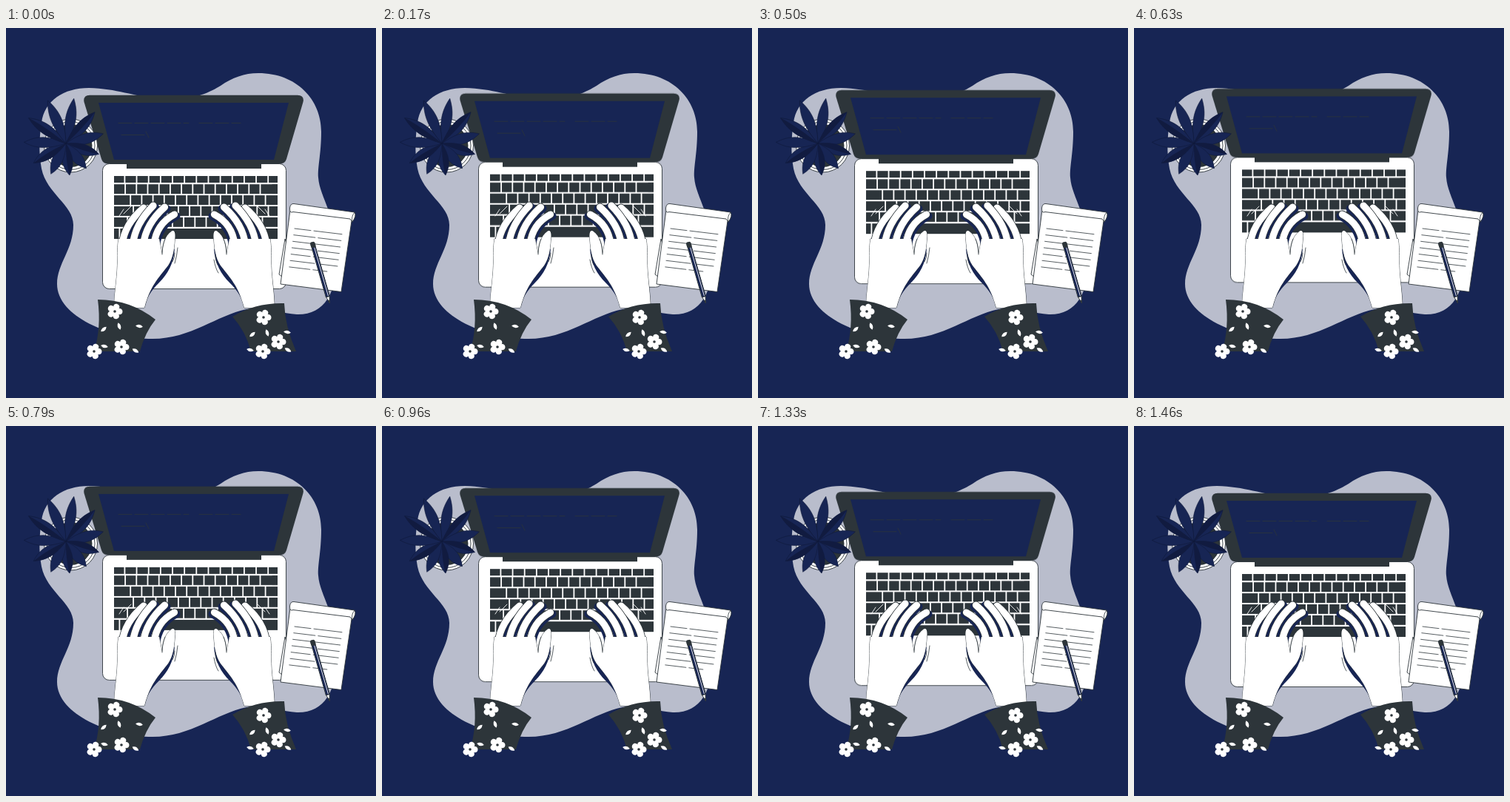
These frames come from a looping animation (500x500 px, 1500 ms). An HTML page:

```html
<!DOCTYPE html>
<html lang="en">
<head>
<meta charset="utf-8">
<title>Typing</title>
<style>
  html, body { margin: 0; width: 100%; height: 100%; overflow: hidden; background: #172554; }
  svg { display: block; width: 100%; height: 100%; }
  .navy { fill: #172554; }
  .dark { fill: #2d353a; }
  .white { fill: #fff; }
  .line { stroke: #2d353a; stroke-width: .9; stroke-linejoin: round; }
  .thin { fill: none; stroke: #2d353a; stroke-width: .8; stroke-linecap: round; }
  .spark { fill: none; stroke: #fff; stroke-width: .9; stroke-linecap: round; }
  .finger { fill: none; stroke-linecap: round; }
</style>
</head>
<body>
<svg viewBox="0 0 500 500">
  <defs>
    <path id="palm" d="M146 378C147 350 151 335 150.500 312C150.500 300 151 292 152 285H207L211 306
      C212 294 214 281 224 274.500C229 272 229 281 228 287C227 300 226 310 219 321C206 338 195 348 187 378Z"/>
    <g id="arm">
      <path class="navy" d="M228 298C227 318 218 333 207 344C196 355 190 364 187 378L184 372Z"/>
      <g id="shadows"></g>
      <use href="#palm" class="white line"/>
      <g id="fingers"></g>
      <use href="#palm" class="white"/>
      <path class="spark" d="M153 254L159 245M159 251L169 241"/>
      <path class="thin" d="M211 306Q211 294 215 285"/>
    </g>
    <path id="leaf" d="M0 0C10 -20 10 -34 0 -50C-9 -34 -8 -20 0 0Z"/>
    <path id="shade" d="M0 0C2 -18 2 -34 0 -50C-9 -34 -8 -20 0 0Z"/>
    <path id="petal" d="M0 0C-6 -4 -5 -10.500 0 -10.500C5 -10.500 6 -4 0 0Z"/>
    <path id="bit" d="M-5 0Q0 -4.500 5 0Q0 4.500 -5 0Z"/>
  </defs>

  <path fill="#b9bdcc" d="M48 128C52 98 78 81 112 81C150 82 172 92 207 96C250 100 275 87 290 78
    C306 67 322 61 341 61C393 61 426 97 426 140C426 170 421 187 422 202C424 230 448 254 447 312
    C447 358 430 388 393 387C370 386 350 376 325 380C285 388 250 420 198 420C142 420 69 390 69 346
    C69 318 91 300 91 266C91 239 55 224 48 190C44 168 45 148 48 128Z"/>

  <g id="laptop">
    <rect class="white line" x="130.500" y="183.500" width="248" height="169" rx="9"/>
    <path class="dark" d="M113 90.700H394Q403.500 91 401.500 100L379 177Q377 183.500 370 183.500H138Q131 183.500 129 177
      L105.500 100Q104 91 113 90.700Z"/>
    <path class="dark" d="M163 183H345V190H163Z"/>
    <path class="navy" d="M125 101H382L362 178H146Z"/>
    <path class="thin" stroke-dasharray="18 4" d="M152 128.500H247M261 128.500H317"/>
    <path class="thin" d="M156 144.500H187M189 140L193 148"/>
    <g id="keys" class="dark"></g>
  </g>

  <g id="plant">
    <circle class="white line" cx="87.500" cy="159" r="36"/>
    <circle class="white line" cx="87.500" cy="159" r="32.500"/>
    <circle class="dark" cx="87.500" cy="159" r="29"/>
  </g>

  <g id="pad">
    <path class="white line" d="M377 285L369 333L373 336L395 339Z"/>
    <path class="white line" d="M384 246L468 254L453 356.500L371 346Z"/>
    <path class="white line" d="M389 237.500L471 249Q474 254 468 262L465 258L388 248.500Q383 251 383.500 243
      Q384.500 237 389 237.500Z"/>
    <path class="thin" d="M468 262Q466 255 471 249"/>
    <g id="notes"></g>
    <g transform="translate(414.500 292) rotate(-16)">
      <path class="white line" d="M-2.500 73L0 83L2.500 73Z"/>
      <path class="dark" d="M-1.200 79L0 83L1.200 79Z"/>
      <rect class="navy line" x="-2.600" width="5.200" height="74"/>
      <path d="M.8 5V73" stroke="#fff" stroke-width=".8"/>
      <rect class="dark" x="-3.300" y="-3" width="6.600" height="8" rx="2.500"/>
    </g>
  </g>

  <use href="#arm"/>
  <use href="#arm" transform="translate(509 0) scale(-1 1)"/>
  <path class="thin" d="M232 297Q231 308 228 318M228 304Q228 311 225 316
    M281 313Q283 325 287 331M283 306Q283 315 286 320"/>

  <path class="dark" d="M124 367Q168 367 202 394Q188 411 181 437H119Q129 405 124 367Z"/>
  <path class="dark" d="M306 390Q337 371 376 372Q377 403 392 437H331Q324 410 306 390Z"/>
  <g id="print"></g>
</svg>
<script>
  const $ = id => document.getElementById(id);
  const put = (id, list) => $(id).insertAdjacentHTML('beforeend', list.join(''));
  const times = (n, fn) => Array.from({ length: n }, (_, i) => fn(i));
  const use = (id, x, y, turn, size = 1) =>
    `<use href="#${id}" transform="translate(${x} ${y}) rotate(${turn}) scale(1 ${size})"/>`;

  // Keys: a first key of its own width, then an even pitch up to the right edge
  const row = (y, h, first, pitch) => {
    const keys = [[146, 146 + first]];
    for (let x = 147.8 + first; x < 360; x += pitch)
      keys.push([x, x + pitch * 1.7 > 367 ? 367 : x + pitch - 1.8]);
    return keys.map(([a, b]) => `<rect x="${a}" y="${y}" width="${b - a}" height="${h}"/>`);
  };
  put('keys', [
    ...row(200, 9, 13.5, 16.15),
    ...[14.2, 21.3, 25.2, 17.2].flatMap((first, i) => row(211.2 + i * 14.9, 12.9, first, 15.2)),
    ...row(271, 14, 6.5, 212)
  ]);

  // Fingers from little to index, given by their tips
  const tips = [[186, 243], [199, 240], [214.5, 242], [227.5, 252]];
  const fingers = tips.map(([x, y], i) => {
    const base = 157 + i * 14.3;
    return `<path class="finger" d="M${base} 293Q${base + 3} 265 ${x} ${y}"`;
  });
  put('shadows', fingers.map(f => f + ' stroke="#172554" stroke-width="10" transform="translate(3 2)"/>'));
  put('fingers', fingers.map(f =>
    f + ' stroke="#2d353a" stroke-width="10.8"/>' + f + ' stroke="#fff" stroke-width="9.2"/>'));

  // Leaves fan out evenly, longest towards the top left
  put('plant', times(11, i => {
    const turn = 10 + i * 32.7;
    const size = 1.06 + .2 * Math.cos((turn + 20) * Math.PI / 180);
    return '<g class="navy" stroke="#0f1939" stroke-width=".5">' + use('leaf', 81, 156, turn, size) +
      '</g><g fill="#111b40">' + (i % 2 ? use('shade', 81, 156, turn, size) : '') + '</g>';
  }));

  // Written lines, each with one gap
  put('notes', times(7, i => {
    const x = 390 - i * 1.2, y = 271 + i * 8.65;
    const gap = x + 22 + i * 7 % 12, end = i < 6 ? x + 64 : x + 51;
    const at = px => `${px} ${y + (px - x) * .12}`;
    return `<path class="thin" d="M${at(x)}L${at(gap)}M${at(gap + 4)}L${at(end)}"/>`;
  }));

  const flowers = [[147, 383], [119, 437], [156, 431], [348, 391], [347, 437], [368, 424]];
  put('print', flowers.map(([x, y]) =>
    '<g class="white">' + times(5, i => use('petal', x, y, i * 72 + 20)).join('') +
    `</g><circle class="dark" cx="${x}" cy="${y}" r="1.8"/>`));

  const bits = [
    [132, 407], [153, 403], [180, 403], [133, 430], [175, 436],
    [333, 414], [353, 412], [380, 411], [330, 435], [381, 435]
  ];
  const turns = [-42, 72, 8, 12, 30];
  put('print', bits.map(([x, y], i) => '<g class="white">' + use('bit', x, y, turns[i % 5]) + '</g>'));

  // Drift up and back at constant speed, with a short rest at the end
  const lift = (y, offset) => ({ transform: `translateY(${y}px)`, offset });
  $('laptop').animate([lift(0, 0), lift(-10, .4867), lift(0, .9733), lift(0, 1)],
    { duration: 1500, iterations: Infinity });
</script>
</body>
</html>
```
